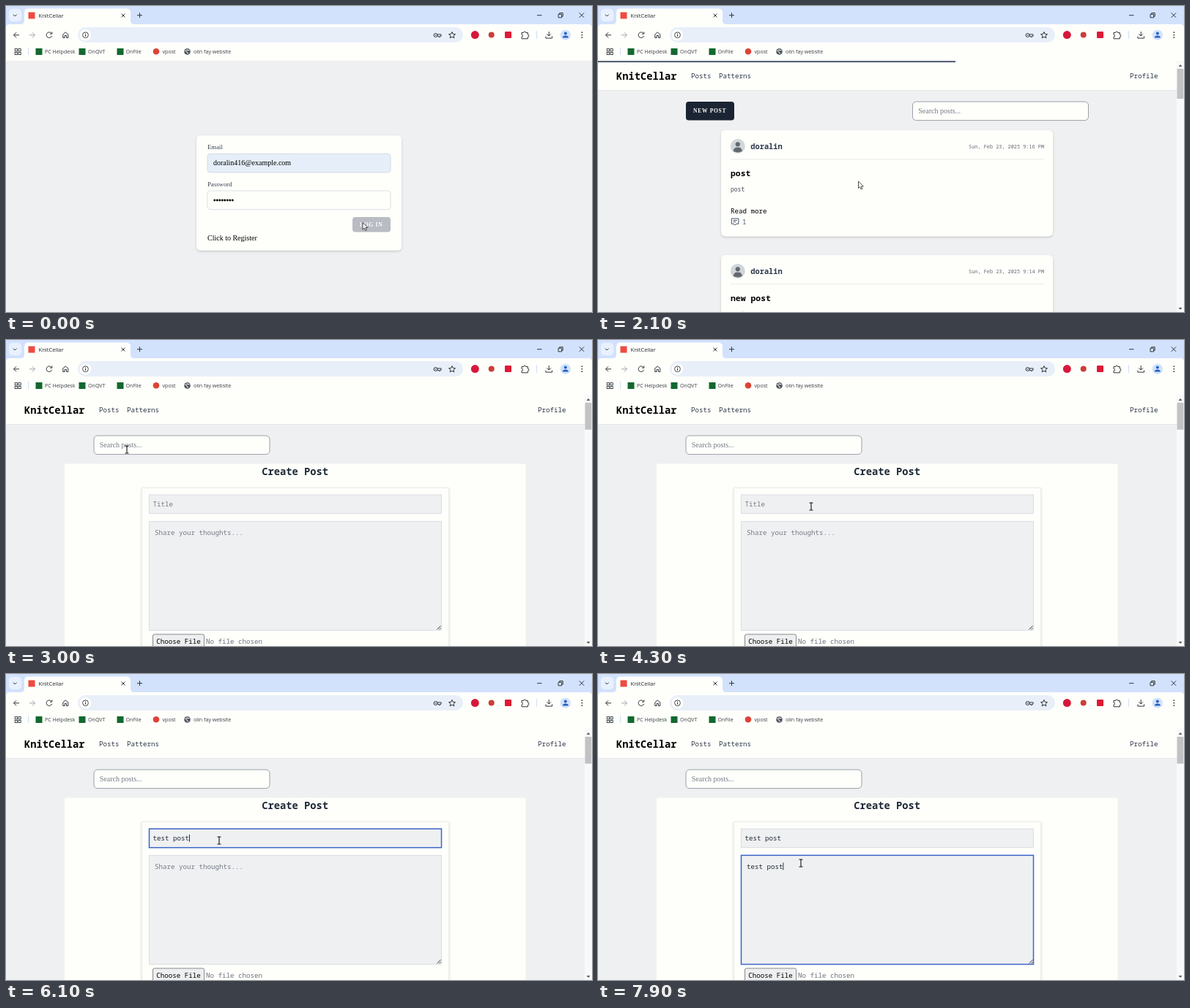
An HTML page for the animation above (8 s loop, 800x419 px).

```html
<!DOCTYPE html>
<html lang="en">
<head>
<meta charset="utf-8">
<title>Post demo</title>
<style>
  html, body { margin: 0; width: 100%; height: 100%; overflow: hidden; background: #eff0f2; }
  svg { display: block; width: 800px; height: 419px; }
  text { white-space: pre; }
  .ui { font-family: "Open Sans", "Noto Sans", sans-serif; }
  .serif { font-family: "Liberation Serif", "Noto Serif", serif; }
  .mono { font-family: "Noto Sans Mono", "DejaVu Sans Mono", monospace; }
  .line { fill: none; stroke: #30343a; stroke-width: 1; }
</style>
</head>
<body>
<svg id="stage" viewBox="0 0 800 419"></svg>
<script>
const LOOP = 8000, STEP = 100, CHAR = 5.5;
const WHITE = '#fefffb', PAGE = '#eff0f2', INK = '#1f2937', GRAY = '#757b85';

const label = (cls, x, y, size, str, fill = '#000', extra = '') =>
  `<text class="${cls}" x="${x}" y="${y}" font-size="${size}" fill="${fill}" ${extra}>${str}</text>`;
const ui = (...a) => label('ui', ...a);
const serif = (...a) => label('serif', ...a);
// size is given for a face whose advance is 0.55em
const mono = (x, y, size, ...a) => label('mono', x, y, size * 0.55 / 0.6, ...a);
const box = (x, y, w, h, r, fill, extra = '') =>
  `<rect x="${x}" y="${y}" width="${w}" height="${h}" rx="${r}" fill="${fill}" ${extra}/>`;
const dot = (x, y, r, fill, extra = '') => `<circle cx="${x}" cy="${y}" r="${r}" fill="${fill}" ${extra}/>`;
const path = (d, extra = '') => `<path class="line" d="${d}" ${extra}/>`;
const border = (color, width = 0.8) => `stroke="${color}" stroke-width="${width}"`;
const BOLD = 'font-weight="700"';
const CAPS = 'font-weight="700" letter-spacing=".75"';
const SHADOW = 'filter="url(#shadow)"';

function browser() {
  const bookmarks = [[53, 'PC Helpdesk'], [112, 'OnQVT'], [163.5, 'OnFile'], [213.5, 'vpost'], [256, 'olin fay website']];
  return box(0, 0, 800, 30, 0, '#d3e2fc') +
    `<path d="M0 75V30Q0 25 5 25H20Q25 25 25 20V9Q25 3.500 31 3.500H164Q170 3.500 170 9V20Q170 25 175 25H795Q800 25 800 30V75Z" fill="${WHITE}"/>` +
    box(4, 4, 17, 17, 5, '#e9f1fe') + path('M9.800 11.600l2.400 2.400l2.400-2.400') +
    box(30.5, 8.5, 9, 9, 0, '#ef4a41') + ui(44.5, 16, 7.6, 'KnitCellar', '#24272b') +
    path('M157.600 10.600l4.800 4.800m0-4.800l-4.800 4.800M179 12.700h7M182.500 9.200v7') +
    path('M725 12.700h6.500M754 11.300h4.600v4.600h-4.600zM755.700 11v-1.400h4.500v4.600h-1.300M782.700 9.400l6.400 6.400m0-6.400l-6.400 6.400') +
    path('M18 39.800h-7.500m3.600-3.600l-3.600 3.600l3.600 3.600') +
    path('M32 39.800h7.500m-3.600-3.600l3.600 3.600l-3.600 3.600', 'style="stroke:#a2a5aa"') +
    path('M61.900 37.300a3.800 3.800 0 1 0 .700 3.500M62.800 35.400v2.800h-2.800') +
    path('M77.800 43.500v-4.700l3.500-2.900l3.500 2.900v4.700h-2.300v-3h-2.400v3z') +
    box(98, 29, 526, 21, 10.5, '#e8eff9') + dot(108.5, 39.7, 7.7, WHITE) +
    dot(108.5, 39.7, 3.9, 'none', border('#30343a', 0.9)) + path('M108.500 39v2.700M108.500 37.300v1') +
    dot(586.5, 40, 2.5, 'none', border('#30343a', 1)) + dot(586.5, 40, 0.8, '#30343a') +
    path('M588.800 38.900h5.200v2.300h-1.400v1.200h-1.800v-1.200h-2') +
    path('M609 35.500l1.300 2.900l3.200.300l-2.400 2.100l.700 3.100l-2.800-1.700l-2.800 1.700l.700-3.100l-2.400-2.100l3.200-.300z') +
    dot(640.3, 39.6, 5.5, '#d6183a') + dot(662.7, 39.6, 4, '#c93f37') + box(681, 35, 9, 9, 1, '#dc1a37') +
    path('M704 36.500h2.700a1.500 1.500 0 0 1 3 0h2.700v2.800a1.500 1.500 0 0 1 0 3v2.500h-8.400v-2.600a1.500 1.500 0 0 0 0-3z') +
    box(724, 34, 1, 11, 0, '#cfdff8') +
    path('M741.200 35v6m-2.700-2.600l2.700 2.700l2.700-2.700M736.900 41.500v2.600h8.600v-2.600', 'stroke-width="1.200"') +
    dot(763.8, 39.7, 7.2, '#d3e3fd') + dot(763.8, 37.5, 2, '#2861c5') +
    '<path d="M759.800 43.600q0-3.200 4-3.200t4 3.200z" fill="#2861c5"/>' +
    [36.2, 39.7, 43.2].map(y => dot(786.3, y, 0.9, '#30343a')).join('') +
    [[12.2, 58.6], [17, 58.6], [12.2, 63.4], [17, 63.4]].map(([x, y]) => box(x, y, 3.2, 3.2, 0, 'none', border('#30343a', 0.9))).join('') +
    box(30, 57, 1, 10, 0, '#cfdff8') +
    [40.5, 99.5, 151.5].map(x => box(x, 58, 9, 9, 0, '#12682f')).join('') + dot(205, 62.3, 4.3, '#dc4437') +
    dot(247.5, 62.4, 4.3, '#555a61') + path('M244 61q3 0 3 2t2 2M247 58.500v2h3.500', 'style="stroke:#eee"') +
    bookmarks.map(([x, s]) => ui(x, 65, 7.1, s, '#3a3e44')).join('');
}

function login() {
  const bullets = Array.from({ length: 8 }, (_, i) => dot(284.8 + 3.5 * i, 266, 1.45, '#000')).join('');
  return box(260, 177.5, 280, 157, 5, WHITE, SHADOW) +
    serif(275, 196.2, 8.75, 'Email', '#374151') +
    box(275, 202.3, 250, 25.6, 3.75, '#e6eff9', border('#cfd5de')) + serif(283, 218.4, 10, 'doralin416@example.com') +
    serif(275, 247, 8.75, 'Password', '#374151') +
    box(275, 253, 250, 25.6, 3.75, WHITE, border('#d3d7df')) + bullets +
    box(473, 289, 52, 20.4, 3.75, '#bfc4c8', 'id="loginButton"') + serif(483, 301.7, 7.5, 'LOG IN', WHITE, CAPS) +
    serif(275, 320.6, 10, 'Click to Register');
}

function frameParts(thumbHeight) {
  return box(0, 76, 790, 40, 0, '#dfe1e4') + box(0, 75, 790, 40.2, 0, WHITE) +
    mono(25, 100.8, 15, 'KnitCellar', '#000', BOLD) +
    mono(127, 99.3, 10, 'Posts', '#2b3445') + mono(165, 99.3, 10, 'Patterns', '#2b3445') + mono(726, 99.3, 10, 'Profile', '#2b3445') +
    box(790, 75, 10, 344, 0, '#f8f9f8') + box(790.5, 86, 8.8, thumbHeight, 0, '#c1c2c4') +
    '<path d="M792.500 83l2.500-3l2.500 3zM792.500 413l2.500 3l2.500-3z" fill="#5c5f63"/>';
}

const search = x => box(x, 131, 240, 25.6, 5, WHITE, border('#858b95')) + serif(x + 7.8, 147.3, 10, 'Search posts...', '#737985');

function card(y, time, title) {
  return `<g transform="translate(0 ${y})">` + box(168, 0, 453, 145.3, 6, WHITE, SHADOW) +
    dot(190.8, 22, 10, '#d1d6d9') + dot(190.8, 19.3, 3.1, '#63696f') +
    '<path d="M184.700 28.800q.500-5.200 6.100-5.200t6.100 5.200q-6.100 3.400-12.200 0z" fill="#63696f"/>' +
    mono(208.3, 26, 11.3, 'doralin', '#2d374b', BOLD) +
    mono(609, 24.5, 7.5, `Sun, Feb 23, 2025 ${time} PM`, '#666b74', 'text-anchor="end"') +
    box(181, 39.5, 428, 0.8, 0, '#e2e5e8') +
    mono(181, 63, 12.5, title, '#000', BOLD) + mono(181, 84, 8.75, 'post', '#454b55', 'font-weight="500"') +
    mono(181, 113.5, 10, 'Read more') +
    path('M182.300 121h9.600v7.300h-3.200l-1.600 1.800l-1.600-1.800h-3.200zM184.500 123.500h5.200M184.500 125.700h3.600', 'style="stroke:#465268"') +
    mono(197, 128.7, 10, '1', '#4b5563') + '</g>';
}

const home = () => box(120, 131, 66, 25.6, 3.75, '#1a2433') + serif(130, 146.4, 7.5, 'NEW POST', WHITE, CAPS) +
  search(429.5) + card(170, '9:16', 'post') + card(341, '9:14', 'new post') + frameParts(41);

function create() {
  return search(120) + box(80, 169.5, 629.5, 260, 3, WHITE) +
    mono(394.7, 184.6, 15, 'Create Post', INK, BOLD + ' text-anchor="middle"') +
    box(185.3, 202.3, 419.4, 240, 1, WHITE, SHADOW + border('#dfe2e7')) +
    box(195.5, 212, 399, 25.7, 0, PAGE, 'id="titleBox"') + mono(200.5, 228.4, 10, '', GRAY, 'id="titleText"') +
    box(195.5, 248.3, 399, 149.2, 0, PAGE, 'id="bodyBox"') + mono(203, 267, 10, '', GRAY, 'id="bodyText"') +
    path('M588.500 396.300l5-5M591.500 396.300l2-2', 'stroke-width=".800"') +
    box(0, 0, 0.8, 10, 0, '#000', 'id="caret"') +
    box(200.5, 403, 70, 24, 2, '#eeeff0', border('#6d7075')) +
    mono(205.3, 416, 10, 'Choose File', '#000', 'font-weight="500"') + mono(273, 416, 10, 'No file chosen', '#6b7280') +
    frameParts(36.7);
}

const stage = document.getElementById('stage');
stage.innerHTML = `<defs><filter id="shadow" x="-5%" y="-10%" width="110%" height="120%">
  <feDropShadow dx="0" dy="1.500" stdDeviation="1.600" flood-color="#000" flood-opacity=".18"/></filter></defs>` +
  box(0, 0, 800, 419, 0, PAGE) + `<g id="login">${login()}</g><g id="home">${home()}</g><g id="create">${create()}</g>` + browser() +
  box(0, 75.2, 0, 1.9, 0, '#435064', 'id="bar"') +
  `<g id="cursor">
    <path id="arrow" d="M0 0V9.600L2.200 7.600L3.700 11L5.300 10.300L3.800 7H6.800Z" fill="#fff" stroke="#222" stroke-width=".800"/>
    <path id="beam" d="M-2.500-5H-.600L0-4.500L.600-5H2.500M0-4.500V4.500M-2.500 5H-.600L0 4.500L.600 5H2.500" fill="none" stroke="#111" stroke-width="1.100"/>
    <path id="hand" d="M-1 0Q0-1 1 0V4L5 5Q6 5.500 5.700 7L5 11H0L-3.500 7Q-3.500 5.500-1 7Z" fill="#fff" stroke="#222" stroke-width=".800"/>
  </g>`;
const el = id => document.getElementById(id);
const show = (id, on) => { el(id).style.display = on ? '' : 'none'; };
const set = (id, attrs) => Object.entries(attrs).forEach(([k, v]) => el(id).setAttribute(k, v));

const POINTER = [[0, 487, 296.5], [200, 487, 296.5], [900, 228, 211], [1100, 224, 208], [1500, 226, 209], [2100, 355.5, 240],
  [2600, 153, 148], [2800, 155, 149], [3000, 165, 150], [3500, 168, 152], [4200, 291, 228], [6400, 291, 228], [6800, 277, 259]];
const BAR = [[800, 0], [900, .02], [1000, .08], [1100, .0925], [1300, .18], [1500, .28], [1700, .32], [2000, .38], [2100, .61], [2200, .92], [2300, 1]];
const HOME_AT = 2100, CREATE_AT = 2800, TITLE_FOCUS = 4600, BODY_FOCUS = 6800;
const TYPED = 'test post';
const FIELDS = {
  login: [[275, 202, 525, 228], [275, 253, 525, 279]],
  home: [[429, 131, 670, 157]],
  create: [[120, 131, 360, 157], [195, 212, 595, 238], [195, 248, 595, 398]],
};

function sample(keys, t, ease = k => k) {
  const i = keys.findIndex(k => k[0] > t);
  if (i < 0) return keys.at(-1).slice(1);
  if (i === 0) return keys[0].slice(1);
  const [a, b] = [keys[i - 1], keys[i]];
  const k = ease((t - a[0]) / (b[0] - a[0]));
  return a.slice(1).map((v, j) => v + (b[j + 1] - v) * k);
}
const smooth = k => k * k * (3 - 2 * k);
const inside = (x, y) => ([l, t, r, b]) => x >= l && x <= r && y >= t && y <= b;

function field(name, placeholder, t, start, step, focused) {
  const count = Math.max(0, Math.min(TYPED.length, Math.floor((t - start) / step) + 1));
  el(name + 'Text').textContent = count ? TYPED.slice(0, count) : placeholder;
  set(name + 'Text', { fill: count ? INK : GRAY });
  set(name + 'Box', { stroke: focused ? '#3d66c9' : '#d3d7dd', 'stroke-width': focused ? 1.5 : 0.8 });
  return { count, lastKey: start + (count - 1) * step };
}

function draw(t) {
  const scene = t < HOME_AT ? 'login' : t < CREATE_AT ? 'home' : 'create';
  ['login', 'home', 'create'].forEach(id => show(id, id === scene));
  set('loginButton', { fill: t < 100 ? '#babcc4' : '#bfc4c8' });

  const [progress] = sample(BAR, t);
  set('bar', { width: 800 * progress, opacity: Math.max(0, Math.min(1, (2500 - t) / 200)) });

  const inBody = t >= BODY_FOCUS, inTitle = t >= TITLE_FOCUS && !inBody;
  const title = field('title', 'Title', t, 4900, 120, inTitle);
  const body = field('body', 'Share your thoughts...', t, 7000, 100, inBody);
  const active = inBody ? body : title;
  const since = t - (active.count ? active.lastKey : inBody ? BODY_FOCUS : TITLE_FOCUS);
  show('caret', (inTitle || inBody) && since % 1000 < 500);
  set('caret', { x: (inBody ? 203 : 200.5) + CHAR * active.count, y: inBody ? 258.3 : 219.8 });

  const [x, y] = sample(POINTER, t, smooth);
  const over = inside(x, y);
  const kind = FIELDS[scene].some(over) ? 'beam' : scene === 'home' && over([120, 131, 186, 157]) ? 'hand' : 'arrow';
  ['arrow', 'beam', 'hand'].forEach(id => show(id, id === kind));
  set('cursor', { transform: `translate(${x} ${y})` });
}

const begin = performance.now();
function tick(now) {
  const t = Math.max(0, now - begin) % LOOP;
  draw(Math.floor(t / STEP) * STEP);
  requestAnimationFrame(tick);
}
draw(0);
requestAnimationFrame(tick);
</script>
</body>
</html>
```
